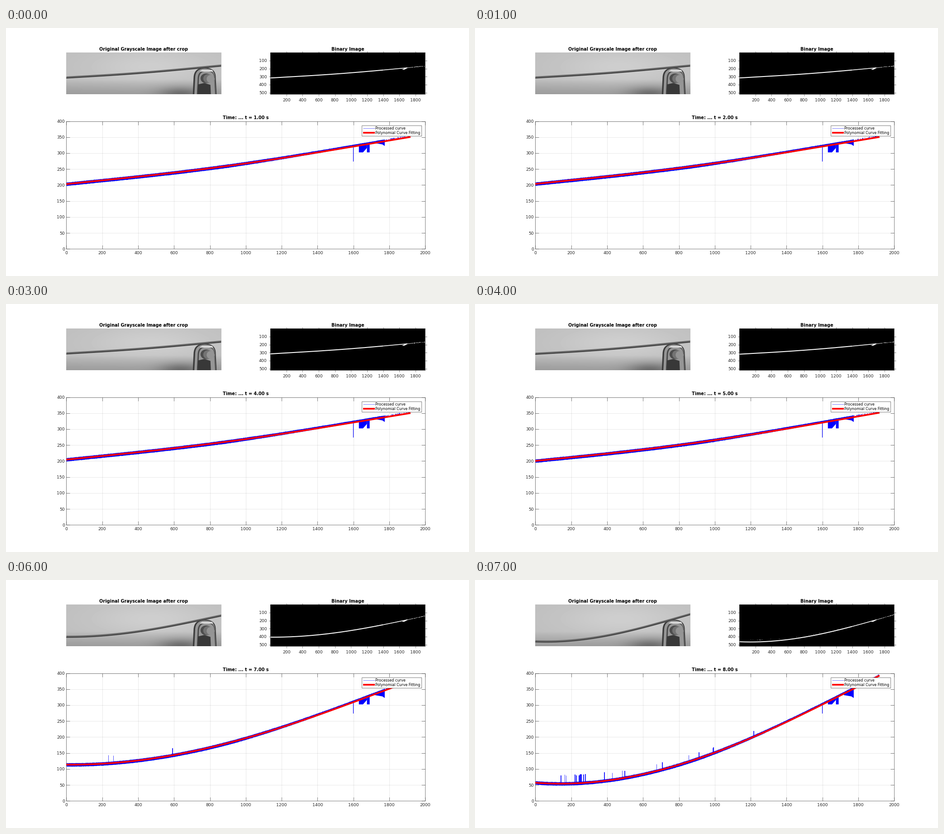
Write a matplotlib script that moves like this. It is 1023 px wide and 547 px high and loops after 8 s.

```python
import numpy as np
import matplotlib.pyplot as plt
from matplotlib.animation import FuncAnimation
from matplotlib.patches import Circle, Ellipse, PathPatch, Polygon, Rectangle
from matplotlib.path import Path

W, H = 1023, 547
PX = 0.72                 # points per pixel at 100 dpi
INK = "#262626"
SCALE = 342 / 1920        # stage pixels per camera pixel
ROWS = 520
SECONDS = 8

plt.rcParams["font.family"] = "DejaVu Sans"

# Beam height = resting shape + sag(time) * bending shape
KNOTS = [0, 400, 800, 1200, 1600, 1920]
REST = np.polynomial.Polynomial.fit(KNOTS, [203, 226.5, 251.7, 285, 320.3, 351], 4)
BEND = np.polynomial.Polynomial.fit(KNOTS, [-146, -163, -138, -89, -18, 42], 4)

# Lower outline of the clamp reflections
BLOCKS = [
    [(1629, 303), (1652, 303), (1674, 317)],
    [(1674, 303), (1689, 303)],
    [(1718, 332), (1760, 328), (1773, 323)],
]


def sag_at(step):
    swing = 1 - np.cos(.6 * max(0, step - 3.5))
    return swing / 1.474 - .003 * step


fig = plt.figure(figsize=(W / 100, H / 100), dpi=100, facecolor="white")


def stage_axes(x0, y0, x1, y1, **kw):
    return fig.add_axes([x0 / W, 1 - y1 / H, (x1 - x0) / W, (y1 - y0) / H], **kw)


def style(ax, length, direction, pad_x, pad_y):
    ax.tick_params(direction=direction, length=length * PX, width=.42, color=INK,
                   labelcolor=INK, labelsize=9.3 * PX, top=True, right=True)
    ax.tick_params(axis="x", pad=pad_x * PX)
    ax.tick_params(axis="y", pad=pad_y * PX)
    for side in ax.spines.values():
        side.set(linewidth=.42, color=INK)


photo = stage_axes(133, 54, 475.3, 146.3)
photo.axis("off")
binary = stage_axes(584, 54, 926.3, 146.3, facecolor="black")
binary.set(xlim=(0, 1920), ylim=(ROWS, 0),
           xticks=range(200, 1801, 200), yticks=range(100, 501, 100))
style(binary, 3.5, "out", 5, 4)
plot = stage_axes(133.3, 205.5, 926.3, 487.3)
plot.set(xlim=(0, 2000), ylim=(0, 400),
         xticks=range(0, 2001, 200), yticks=range(0, 401, 50))
plot.set_axisbelow(True)
plot.grid(color=INK, alpha=.15, linewidth=.5)
style(plot, 8, "in", 5, 3.5)

overlay = stage_axes(0, 0, W, H, zorder=5)
overlay.axis("off")
overlay.set(xlim=(0, W), ylim=(H, 0))


def title(x, y, text):
    return overlay.text(x, y, text, size=9.77 * PX, weight="bold", ha="center",
                        va="baseline", color="black")


title(304.3, 50, "Original Grayscale Image after crop")
title(755, 50, "Binary Image")
clock = title(529.8, 201.3, "")


def legend():
    overlay.add_patch(Rectangle((785.5, 214.5), 132, 23, facecolor="white",
                                edgecolor=INK, linewidth=.42))
    entries = [("Processed curve", 220.5, "#7a7aff", 1),
               ("Polynomial Curve Fitting", 231, "red", 3.7)]
    for text, y, color, width in entries:
        overlay.plot([788.5, 815], [y, y], color=color, lw=width * PX,
                     solid_capstyle="butt")
        overlay.text(816, y + 3, text, size=8.1 * PX, color="black", va="baseline")


def arch(x0, x1, top, shade):
    mid, shoulder, bottom = (x0 + x1) / 2, top + (x1 - x0) * .4, 150
    points = [(x0, bottom), (x0 + 2, shoulder), (x0 + 3, top), (mid, top),
              (x1 - 2, top), (x1 - 2, shoulder), (x1, bottom)]
    codes = [Path.MOVETO, Path.LINETO] + [Path.CURVE3] * 4 + [Path.LINETO]
    photo.add_patch(PathPatch(Path(points, codes), facecolor=str(shade / 255),
                              edgecolor="none", zorder=4))


def photo_scene():
    u, v = np.meshgrid(np.linspace(0, 1, 171), np.linspace(0, 1, 46))
    wall = 190 + 16 * np.exp(-((u - .55) / .4) ** 2 - ((v - .35) / .4) ** 2)
    wall -= 34 * np.clip((v - .66) / .34, 0, 1) ** .8
    wall -= 50 * np.exp(-((u - .74) / .14) ** 2 - ((v - 1) / .17) ** 2)
    photo.imshow(wall, cmap="gray", vmin=0, vmax=255, aspect="auto",
                 extent=(133, 475.3, 146.3, 54), interpolation="bilinear")
    photo.set(xlim=(133, 475.3), ylim=(146.3, 54))
    arch(412.5, 465.5, 87.5, 60)
    arch(416, 463.5, 89.5, 150)
    arch(421.5, 463, 93.5, 75)
    arch(424.5, 462, 95.5, 150)
    photo.add_patch(Polygon([(424, 146.3), (425, 125), (438, 122), (451, 126),
                             (452, 146.3)], color="0.22", zorder=5))
    photo.add_patch(Polygon([(429, 95.5), (434, 93), (455, 93), (457, 95.5)],
                            color="0.86", zorder=5))
    photo.add_patch(Ellipse((442, 111), 23, 20, color="0.3", zorder=6))
    photo.add_patch(Ellipse((446.5, 111.5), 20, 18, color="0.45", zorder=6))
    photo.add_patch(Circle((452, 112.3), 8, color="0.58", zorder=6))


legend()
photo_scene()
xs = np.arange(0, 1921, 2.0)
parts = []


def draw_photo(curve):
    px, py = 133 + xs * SCALE, 54 + (ROWS - curve(xs)) * SCALE
    parts.append(photo.fill_between(px, py - 4, py + .7, color="0.4",
                                    lw=0, zorder=7))
    parts.extend(photo.plot(px, py, color="0.22", lw=1.3 * PX, zorder=8))


def draw_binary(curve, frag_x, frag_y, spikes):
    for x0, x1, width in [(0, 1400, 2), (1400, 1700, 1.6), (1700, 1775, .8)]:
        x = xs[(xs >= x0) & (xs <= x1)]
        parts.extend(binary.plot(x, ROWS - curve(x), color="white",
                                 lw=width * PX, solid_capstyle="butt"))
    blob = [(1632, 213), (1660, 199), (1700, 187), (1685, 202), (1655, 216)]
    parts.append(binary.add_patch(Polygon(blob, color="white", lw=0)))
    parts.append(binary.scatter(frag_x, ROWS - frag_y, s=.4, c="white",
                                linewidths=0, alpha=.6))
    for x, top, width in spikes:
        parts.append(binary.scatter([x], [ROWS - top], s=.15 * width, c="white",
                                    linewidths=0))


def draw_plot(curve, frag_x, frag_y, spikes, rng):
    x = xs[xs <= 1775]
    y = curve(x)
    low = y - np.interp(x, [900, 1500], [5.2, 1])
    high = y + np.interp(x, [800, 1600], [5.4, 6.4])
    shake = rng.uniform(-.5, .5, (2, x.size))
    parts.append(plot.fill_between(x, low + shake[0], high + shake[1],
                                   color="blue", lw=0, zorder=2))
    for block in BLOCKS:
        bx, by = zip(*block)
        x = np.linspace(bx[0], bx[-1], 40)
        floor = np.interp(x, bx, by)
        parts.append(plot.fill_between(x, floor, curve(x), where=floor < curve(x),
                                       color="blue", lw=0, zorder=2))
    for x, end, width in [(1598, 274, 1.2), *spikes]:
        parts.extend(plot.plot([x, x], [curve(x), end], color="blue",
                               lw=width * PX, solid_capstyle="butt", zorder=2))
    parts.append(plot.vlines(frag_x, frag_y - 1.5, frag_y + 1, color="blue",
                             lw=.8 * PX, zorder=2))
    x = np.arange(0, 1919, 2)
    parts.extend(plot.plot(x, curve(x), color="red", lw=3.8 * PX,
                           solid_capstyle="butt", zorder=3))


def make_spikes(curve, sag, rng):
    """Noise spikes, more of them the deeper the beam sags."""
    count = round(22 * np.clip(2 * sag - 1, 0, 1) ** 1.3)
    x = 140 + np.minimum(rng.exponential(280, count), 1120)
    top = curve(x) + 29 - .011 * x + rng.uniform(-2, 2, count)
    return list(zip(x, top, rng.choice([.7, 1.7], count)))


def update(step):
    while parts:
        parts.pop().remove()
    rng = np.random.default_rng(40 + step)
    sag = sag_at(step)
    curve = lambda x: REST(x) + sag * BEND(x)
    frag_x = np.sort(rng.uniform(1775, 1915, 46))
    frag_y = curve(frag_x) + rng.uniform(3, 5.5, frag_x.size)
    spikes = make_spikes(curve, sag, rng)
    draw_photo(curve)
    draw_binary(curve, frag_x, frag_y, spikes)
    draw_plot(curve, frag_x, frag_y, spikes, rng)
    clock.set_text(f"Time: ... t = {step + 1:.2f} s")
    return parts


anim = FuncAnimation(fig, update, frames=SECONDS, interval=1000,
                     init_func=lambda: [], repeat=True, repeat_delay=0, blit=False)
plt.show()
```
